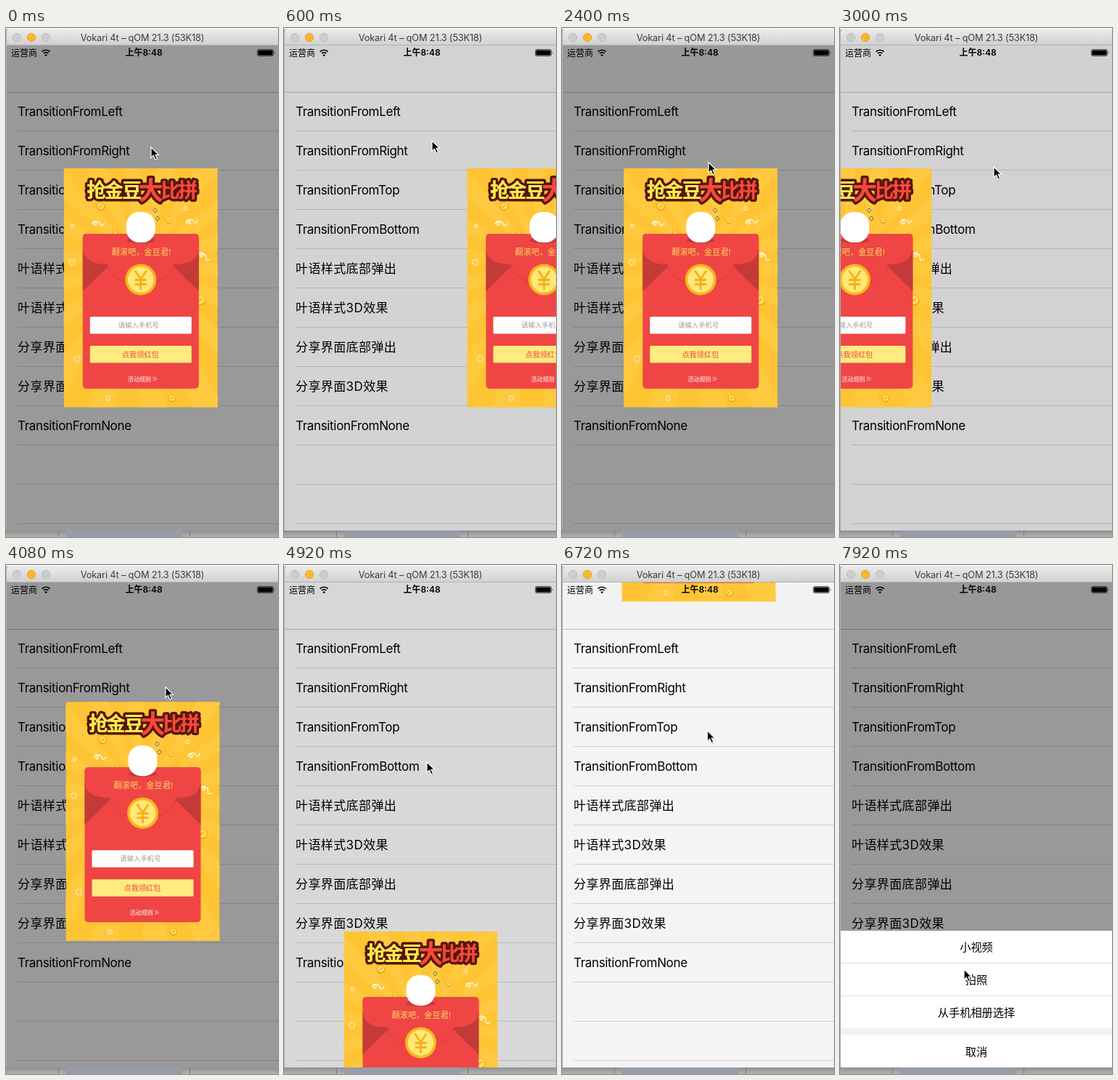
An HTML page for the animation above (8 s loop, 375 by 700 pixels).

```html
<!DOCTYPE html>
<html lang="zh">
<head>
<meta charset="utf-8">
<title>Popup transitions</title>
<style>
html, body { margin: 0; width: 100%; height: 100%; overflow: hidden; background: #b0b0b0; }
#stage { display: block; width: 100%; height: 100%; }
text { font-family: Inter, "Noto Sans CJK SC", "Noto Sans CJK", sans-serif; }
.mid { text-anchor: middle; }
.row { font-size: 17px; }
.latin { letter-spacing: -.33px; }
.cjk { letter-spacing: .4px; }
.art { paint-order: stroke; stroke-linejoin: round; font-weight: 900; }
</style>
</head>
<body>
<svg id="stage" viewBox="0 0 375 700">
  <defs>
    <linearGradient id="bar" x2="0" y2="1">
      <stop stop-color="#ebebeb"/><stop offset="1" stop-color="#d0d0d0"/>
    </linearGradient>
    <linearGradient id="shade" x2="0" y2="1">
      <stop stop-color="#8c8c8c"/><stop offset="1" stop-color="#b2b2b2"/>
    </linearGradient>
  </defs>

  <!-- desktop and window frame -->
  <rect width="375" height="700" fill="#b0b0b0"/>
  <rect width="375" height="2" fill="#f2f2f2"/>
  <rect y="690" width="375" height="10" fill="url(#shade)"/>
  <rect x="83" y="691" width="160" height="9" fill="#969ca8"/>
  <path d="M72.5 691v9M253.5 691v9" stroke="#7d7d7d"/>
  <path d="M1 24V6q0-4 4-4h370v22z" fill="url(#bar)"/>
  <path d="M1 23.5h374" stroke="#b3b3b3"/>
  <g stroke-width=".8">
    <circle cx="15" cy="13" r="5.7" fill="#cdcdcd" stroke="#b9b9b9"/>
    <circle cx="35" cy="13" r="5.7" fill="#fdb52c" stroke="#dfa023"/>
    <circle cx="55" cy="13" r="5.7" fill="#cdcdcd" stroke="#b9b9b9"/>
  </g>
  <text class="mid" x="188" y="17.8" font-size="12.8" letter-spacing="-.15" fill="#3c3c3c">Vokari 4t – qOM 21.3 (53K18)</text>

  <!-- phone screen -->
  <svg x="1" y="24" width="374" height="667" viewBox="1 24 374 667">
    <rect x="1" y="24" width="374" height="667" fill="#fefefe"/>
    <rect x="1" y="24" width="374" height="64" fill="#fcfcfc"/>
    <path d="M1 88.5h374" stroke="#c6c6c6"/>
    <g id="list"></g>
    <rect id="dim" x="1" y="24" width="374" height="667"/>

    <g id="popup">
      <svg width="212" height="328.5">
        <rect width="212" height="329" fill="#ffc433"/>
        <path id="rays" fill="#ffc93f"/>
        <g id="confetti"></g>
        <rect x="26" y="90" width="160" height="213" rx="5" fill="#ef4645"/>
        <path d="M26 113V169L66 130ZM186 113V169L146 130Z" fill="#c43a38"/>
        <path id="flap" d="M26 113C28 125 40 133 60 132C64 150 84 160 106 160S148 150 152 132C172 133 184 125 186 113V95q0-5-5-5H31q-5 0-5 5Z" fill="#ef4645"/>
        <path d="M26 113C28 125 40 133 60 132C64 150 84 160 106 160S148 150 152 132C172 133 184 125 186 113" fill="none" stroke="#cf3b3a"/>
        <ellipse cx="106" cy="99" rx="20" ry="4" fill="#c43a38"/>
        <rect x="86" y="60" width="40" height="42" rx="18" fill="#fff"/>
        <text x="66" y="119.2" font-size="11" letter-spacing=".2" fill="#ffd85c">翻滚吧，金豆君!</text>
        <circle cx="106" cy="153" r="21.5" fill="#f7b81d"/>
        <circle cx="106" cy="153" r="17.8" fill="#ffe778"/>
        <path d="M98 140.5l8 12 8-12M106 152.5V167M98 153.5h16M98 159.5h16" fill="none" stroke="#f5b01c" stroke-width="2.8"/>
        <rect x="36" y="204" width="140" height="23.5" rx="1.5" fill="#fff"/>
        <text class="mid" x="103" y="219.2" font-size="9.4" fill="#9a9a9a">请输入手机号</text>
        <rect x="36" y="244" width="140" height="23.5" rx="1.5" fill="#ffec80"/>
        <text class="mid" x="105.5" y="259.8" font-size="10.2" font-weight="500" fill="#e84540">点我领红包</text>
        <text x="88" y="292.5" font-size="8.1" fill="#fff">活动规则</text>
        <path d="M122.5 286.8l2.6 2.7-2.6 2.7M125.3 286.8l2.6 2.7-2.6 2.7" fill="none" stroke="#fff" stroke-width=".8"/>
        <g id="title"></g>
      </svg>
    </g>

    <g id="sheet">
      <rect x="1" width="374" height="188" fill="#fff"/>
      <rect x="1" y="134" width="374" height="9.5" fill="#f2f2f2"/>
      <path d="M1 44.5h374M1 89.5h374" stroke="#dedede"/>
    </g>

    <!-- status bar -->
    <text x="7" y="38.6" font-size="12">运营商</text>
    <path d="M49.6 32.6a7.6 7.6 0 0 1 11 0M51.9 35a4.5 4.5 0 0 1 6.4 0" fill="none" stroke="#000" stroke-width="1.7"/>
    <path d="M55.1 39.2l-1.8-2a2.6 2.6 0 0 1 3.6 0z"/>
    <text class="mid" x="190" y="38.4" font-size="12" font-weight="600">上午8:48</text>
    <rect x="346.5" y="29.5" width="22" height="9" rx="2" fill="none" stroke="#000" stroke-width=".6"/>
    <rect x="347.4" y="30.4" width="20.2" height="7.2" rx="1"/>
    <path d="M369.8 32.3q1.6 1.7 0 3.4z"/>
  </svg>

  <g id="mouse">
    <path d="M1 1.5V16L4.4 12.8 7 18.5 9.6 17.5 7 11.8H11.5Z" fill="#000" opacity=".2"/>
    <path d="M0 0V14.5L3.4 11.3 6 17 8.6 16 6 10.3H10.5Z" stroke="#fff" stroke-width="1.2"/>
  </g>
</svg>

<script>
const $ = id => document.getElementById(id);

function add(parent, tag, attrs, text) {
  const el = document.createElementNS('http://www.w3.org/2000/svg', tag);
  for (const key in attrs) el.setAttribute(key, attrs[key]);
  if (text) el.textContent = text;
  return parent.appendChild(el);
}

// List rows
const labels = ['TransitionFromLeft', 'TransitionFromRight', 'TransitionFromTop', 'TransitionFromBottom',
  '叶语样式底部弹出', '叶语样式3D效果', '分享界面底部弹出', '分享界面3D效果', 'TransitionFromNone'];
for (let i = 0; i < 11; i++) {
  const y = 115 + 54 * i;
  if (labels[i]) {
    const kind = labels[i].startsWith('T') ? 'latin' : 'cjk';
    add($('list'), 'text', { x: 16, y: y + 6, class: 'row ' + kind }, labels[i]);
  }
  add($('list'), 'path', { d: `M16 ${y + 26.5}h359`, stroke: '#dadadc' });
}

// Action sheet labels
[['小视频', 22], ['拍照', 67], ['从手机相册选择', 112], ['取消', 166]].forEach(([label, y]) =>
  add($('sheet'), 'text', { x: 188, y: y + 5.7, class: 'mid', 'font-size': 15.2 }, label));

// Sunburst
const rayCount = 18;
let rays = '';
for (let i = 0; i < rayCount; i++) {
  const point = k => {
    const a = (i + k) * 2 * Math.PI / rayCount;
    return `${106 + 300 * Math.cos(a)} ${130 + 300 * Math.sin(a)}`;
  };
  rays += `M106 130L${point(0)}L${point(.5)}Z`;
}
$('rays').setAttribute('d', rays);

// Small coins, bursts and ribbons
const confetti = $('confetti');
for (const [x, y, r] of [[51, 52, 5.5], [145, 71, 4.5], [71, 87, 4], [188, 181, 7], [148.5, 316, 5]]) {
  add(confetti, 'circle', { cx: x, cy: y + .6, r, fill: '#e79e12' });
  add(confetti, 'circle', { cx: x, cy: y, r: r - 1, fill: '#ffe05f' });
  add(confetti, 'path', { d: `M${x - r * .4} ${y + r * .3}l${r * .8} ${-r * .6}`, stroke: '#eda51a', 'stroke-width': 1.5 });
}
for (const [x, y, r] of [[12, 79, 3], [11, 129, 5], [18, 262, 5.5], [61, 316, 4], [168, 55, 3.5]])
  for (let k = 0; k < 7; k++)
    add(confetti, 'path', {
      d: `M${r * .5} 0H${r}`, stroke: '#fff8dc', 'stroke-width': 1.2,
      transform: `translate(${x} ${y}) rotate(${k * 360 / 7})`
    });
const ribbon = 'M0 4C1-2 6-2 6 2S2 6 3 2 9-2 11 2S15 4 17 0';
for (const [x, y, turn] of [[39, 73, 8], [168, 72, -5], [188, 115, 35]])
  add(confetti, 'path', {
    d: ribbon, fill: 'none', stroke: '#fffbe8', 'stroke-width': 1.3,
    transform: `translate(${x} ${y}) rotate(${turn})`
  });
for (const [x, y] of [[126, 58], [129, 69]])
  add(confetti, 'path', { d: `M${x} ${y - 3}l2.5 3-2.5 3-2.5-3z`, fill: '#ffe98a', stroke: '#333', 'stroke-width': .8 });

// Headline: a dark outline below, coloured letters above
const headline = [['抢', 45, 27], ['金', 69, 26], ['豆', 94, 27], ['大', 120, 34], ['比', 147, 26], ['拼', 171, 27]];
for (const outline of [true, false])
  headline.forEach(([char, x, size], i) => add($('title'), 'text', {
    x, y: 30 + size * .37, class: 'mid art', 'font-size': size,
    fill: i < 3 ? '#ffe84e' : '#f9473c',
    stroke: outline ? '#54170b' : 'none', 'stroke-width': 7
  }, char));

// Motion
const LOOP = 8000, STEP = 120;
const HOME = [82.5, 193];
const LEFT = [-294, 0], RIGHT = [294, 0], TOP = [0, -521], BOTTOM = [0, 498];
const popups = [
  { show: -420, hide: 325, from: LEFT, to: RIGHT },
  { show: 1980, hide: 2727, from: RIGHT, to: LEFT },
  { show: 3660, hide: 4630, from: TOP, to: BOTTOM },
  { show: 5460, hide: 6320, from: BOTTOM, to: TOP }
];
// The first popup rebounds short of home, to the left
const HIDE_TIME = 500, SHEET_START = 7390;
const mousePath = [
  [0, 200, 164], [360, 204, 155], [1080, 204, 155], [1800, 172, 166], [1920, 172, 166],
  [2640, 212, 191], [3000, 212, 191], [3360, 206, 222], [3600, 206, 222], [4080, 220, 168],
  [4560, 220, 168], [4920, 197, 271], [5160, 197, 276], [5400, 197, 276], [5880, 196, 231],
  [6120, 212, 175], [6480, 212, 175], [7080, 178, 328], [7440, 178, 328], [7920, 171, 556], [8000, 171, 556]
];

const clamp = v => Math.max(0, Math.min(1, v));
const ease = v => .5 - .5 * Math.cos(Math.PI * clamp(v));
const spring = ms => {
  const s = ms / 1000, decay = 11.2, freq = 15;
  return 1 - Math.exp(-decay * s) * (Math.cos(freq * s) + decay / freq * Math.sin(freq * s));
};
const move = (el, x, y) => el.setAttribute('transform', `translate(${x} ${y})`);

function mouseAt(t) {
  const i = mousePath.findIndex(p => p[0] > t);
  const [t0, x0, y0] = mousePath[i - 1], [t1, x1, y1] = mousePath[i];
  const k = ease((t - t0) / (t1 - t0));
  return [x0 + (x1 - x0) * k, y0 + (y1 - y0) * k];
}

function draw(t) {
  let dim = 0;
  const active = popups.find(p => t >= p.show && t < p.hide + HIDE_TIME);
  $('popup').style.display = active ? '' : 'none';
  if (active) {
    const leaving = t >= active.hide;
    const out = ease((t - active.hide) / HIDE_TIME);
    const away = leaving ? out : 1 - spring(t - active.show);
    const [dx, dy] = leaving ? active.to : active.from;
    move($('popup'), HOME[0] + dx * away, HOME[1] + dy * away);
    dim = leaving ? 1 - out : clamp((t - active.show) / 300);
  }
  const up = ease((t - SHEET_START) / 300);
  $('sheet').style.display = up ? '' : 'none';
  move($('sheet'), 0, 691 - 188 * up);
  $('dim').setAttribute('opacity', .4 * Math.max(dim, up));
  move($('mouse'), ...mouseAt(t));
}

const start = performance.now();
function tick() {
  const t = (performance.now() - start) % LOOP;
  draw(Math.floor(t / STEP) * STEP);
  requestAnimationFrame(tick);
}
tick();
</script>
</body>
</html>
```
